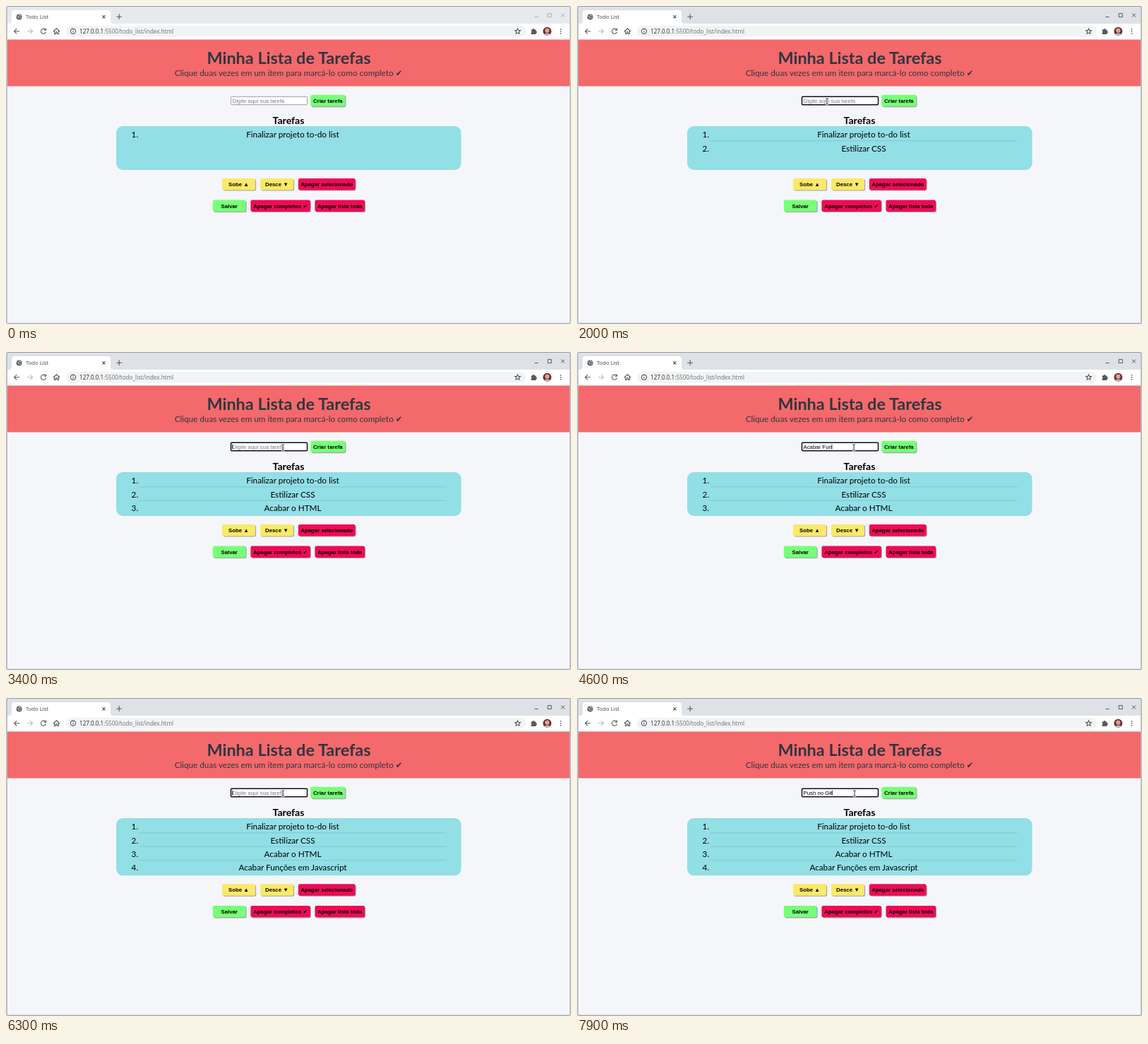
An HTML page for the animation above (8000 ms loop, 800x450 px).

```html
<!DOCTYPE html>
<html lang="pt">
<head>
<meta charset="utf-8">
<title>Todo List</title>
<style>
  html, body { margin: 0; width: 100%; height: 100%; overflow: hidden; }
  svg { display: block; width: 800px; height: 450px; }
  text { white-space: pre; }
  .ui { font: 8.1px "Open Sans", "Noto Sans", sans-serif; }
  .lato { font: 11.71px Lato, "DejaVu Sans", sans-serif; }
  .form { font: 7.81px "Liberation Sans", "DejaVu Sans", Arial, sans-serif; }
  .bold { font-weight: 700; }
  .mid { text-anchor: middle; }
  .icon { fill: none; stroke: #55595e; stroke-width: 1.1; }
</style>
</head>
<body>
<svg viewBox="0 0 800 450">
  <!-- browser window -->
  <rect id="strip" width="800" height="450"/>
  <path d="M4 25Q8 25 8 21V10Q8 6 12 6H144Q148 6 148 10V21Q148 25 152 25H798V48H2V25Z" fill="#fff"/>
  <circle cx="18.6" cy="15.4" r="4" fill="#55595e"/>
  <path d="M15.6 14l2.6 1.5-.4 2.3M18.5 12l.8 1.7 2.2.5M20 17.8l1-1.7" fill="none" stroke="#fff" stroke-width=".9"/>
  <text class="ui" x="28" y="18" style="font-size:7.7px" fill="#3c4043">Todo List</text>
  <g class="icon">
    <path d="M136.4 13.2l4.2 4.2m0-4.2l-4.2 4.2M156.3 15.2h7.8m-3.9-3.9v7.8"/>
    <path d="M19.2 35.7h-7.6m3.6-3.6l-3.6 3.6 3.6 3.6"/>
    <path d="M30 35.7h7.6m-3.6-3.6l3.6 3.6-3.6 3.6" stroke="#b9bbbe"/>
    <path d="M55.8 33.3a3.6 3.6 0 1 0 .8 3.3M56.6 31.6v2.7h-2.8"/>
    <path d="M67 36l4.5-4.2L76 36M68.5 35v4.5h2v-2.7h2v2.7h2V35"/>
  </g>
  <rect x="85" y="28" width="651" height="15.4" rx="7.7" fill="#f1f3f4"/>
  <g class="icon" stroke-width=".9">
    <circle cx="95" cy="35.7" r="3.6"/>
    <path d="M95 35.2v2.4M95 33.4v.9"/>
    <path d="M724.5 31.9l1.1 2.5 2.7.3-2 1.8.6 2.7-2.4-1.4-2.4 1.4.6-2.7-2-1.8 2.7-.3Z"/>
  </g>
  <text class="ui" x="104" y="38.6" fill="#6a6d71"><tspan fill="#26282b">127.0.0.1</tspan>:5500/todo_list/index.html</text>
  <path d="M743.5 33.5h2a1.4 1.4 0 0 1 2.8 0h2.1v2.1a1.4 1.4 0 0 1 0 2.8v1.5h-6.9v-2a1.4 1.4 0 0 0 0-2.6Z" fill="#55595e"/>
  <clipPath id="face"><circle cx="766.3" cy="35.7" r="6"/></clipPath>
  <g clip-path="url(#face)">
    <path d="M760 29h13v13h-13Z" fill="#6b3038"/>
    <circle cx="766.3" cy="34.7" r="3.1" fill="#d8a493"/>
    <ellipse cx="766.3" cy="42" rx="5" ry="3.5" fill="#c3b4b5"/>
  </g>
  <g fill="#55595e"><circle cx="785.5" cy="32.8" r=".9"/><circle cx="785.5" cy="35.8" r=".9"/><circle cx="785.5" cy="38.8" r=".9"/></g>
  <path id="controls" d="M748.5 15.5h5M767.2 10.6h5v5h-5ZM786 10.6l5 5m0-5l-5 5" fill="none"/>

  <!-- page -->
  <path d="M2 47.5H798V448H2Z" fill="#f5f6fa"/>
  <path d="M2 47.5H798V113.5H2Z" fill="#f4696b"/>
  <g class="lato mid">
    <text class="bold" x="400.5" y="81.8" style="font-size:23.43px" fill="#2f3640">Minha Lista de Tarefas</text>
    <text x="400" y="99" fill="#2f3640">Clique duas vezes em um item para marcá-lo como completo ✔</text>
    <text class="bold" x="400" y="167" style="font-size:14.06px">Tarefas</text>
  </g>
  <rect id="field" x="318.5" y="128.3" width="108" height="11.4" rx="1.2" fill="#fff"/>
  <text id="entry" class="form" x="320.5" y="136.7"></text>
  <path id="caret" d="M0 130.6v7" stroke="#000" stroke-width=".8"/>
  <rect id="box" x="156" y="170" width="488.5" rx="9.5" fill="#92dfe5"/>
  <g id="list" class="lato"></g>
  <g id="top" class="form bold mid"></g>
  <g id="actions" class="form bold mid"></g>
  <g id="mouse" fill="none">
    <path id="beam" d="M-2.2 -4.2q2.2 0 2.2 1.2q0 -1.2 2.2 -1.2M0 -3V3M-2.2 4.2q2.2 0 2.2 -1.2q0 1.2 2.2 1.2" stroke="#fff" stroke-width="2"/>
    <use href="#beam" style="stroke:#222;stroke-width:.9"/>
    <path d="M-2.2 -4.2q2.2 0 2.2 1.2q0 -1.2 2.2 -1.2M0 -3V3M-2.2 4.2q2.2 0 2.2 -1.2q0 1.2 2.2 1.2" stroke="#222" stroke-width=".9"/>
  </g>
  <rect x="1" y=".5" width="798" height="448.8" rx="2" fill="none" stroke="#96999f"/>
</svg>
<script>
const LOOP = 8000, STEP = 100, ROW = 19.35;
const GREEN = '#78ff78', YELLOW = '#fbe967', RED = '#ee0b55';

// key times in ms: first letter, time per letter, Enter
const tasks = [
  { text: 'Finalizar projeto to-do list', enter: -1 },
  { text: 'Estilizar CSS', start: 250, pace: 90, enter: 1450 },
  { text: 'Acabar o HTML', start: 2250, pace: 70, enter: 3200 },
  { text: 'Acabar Funções em Javascript', start: 3800, pace: 85, enter: 6150 },
  { text: 'Push no Git', start: 6850, pace: 100, enter: LOOP }
];

const el = id => document.getElementById(id);
const set = (id, attrs) => {
  for (const k in attrs) el(id).setAttribute(k, attrs[k]);
};
const show = (node, on) => { node.style.display = on ? '' : 'none'; };

function button(x, y, w, color, label) {
  const rect = (d, fill) =>
    `<rect x="${x + d}" y="${y + d}" width="${w}" height="16.4" rx="2.4" fill="${fill}"/>`;
  return rect(1.1, '#a3a4a8') + rect(0, color) +
    `<text x="${x + w / 2}" y="${y + 11}">${label}</text>`;
}

el('top').innerHTML = button(431.3, 125.7, 49, GREEN, 'Criar tarefa');
el('actions').innerHTML =
  button(306, 244, 47, YELLOW, 'Sobe ▲') +
  button(360, 244, 47, YELLOW, 'Desce ▼') +
  button(413.8, 244, 80.8, RED, 'Apagar selecionado') +
  button(292.8, 274.6, 46.8, GREEN, 'Salvar') +
  button(346.4, 274.6, 84.4, RED, 'Apagar completos ✔') +
  button(437.4, 274.6, 70.6, RED, 'Apagar lista toda');

el('list').innerHTML = tasks.slice(0, 4).map((task, i) => {
  const y = 186.3 + i * ROW;
  const rule = i ? `<path d="M188.5 ${y - 14.8}H623.5" stroke="#7fc9d1" stroke-width=".9"/>` : '';
  return `<g>${rule}<text x="177.6" y="${y}">${i + 1}.</text>
    <text class="mid" x="406" y="${y}">${task.text}</text></g>`;
}).join('');

function draw(t) {
  const active = t >= 100, focused = t >= 200;
  const count = tasks.filter(task => t >= task.enter).length;
  const { text, start, pace } = tasks[count];
  const typed = Math.max(0, Math.min(text.length, Math.floor((t - start) / pace) + 1));
  const lastKey = typed ? start + (typed - 1) * pace : Math.max(200, tasks[count - 1].enter);

  set('strip', { fill: active ? '#dee1e6' : '#e7eaed' });
  set('controls', { stroke: active ? '#55595e' : '#a9acb0' });
  set('field', {
    stroke: focused ? '#101018' : '#85858a',
    'stroke-width': focused ? 1.5 : 0.8
  });

  const entry = el('entry');
  entry.textContent = typed ? text.slice(0, typed) : 'Digite aqui sua tarefa';
  set('entry', { fill: typed ? '#000' : '#7c7c80' });
  const caretX = 320.6 + (typed ? entry.getComputedTextLength() : 0);
  set('caret', { transform: `translate(${caretX} 0)` });
  show(el('caret'), focused && (t - lastKey) % 1000 < 500);

  [...el('list').children].forEach((row, i) => show(row, i < count));
  const grow = count > 3 ? ROW : 0;
  set('box', { height: 62 + grow });
  set('actions', { transform: `translate(0 ${grow})` });

  const move = Math.max(0, Math.min(1, (t - 2050) / 250));
  const mouseX = 354 + 38 * move * move * (3 - 2 * move) + (t >= 6600 ? 1 : 0);
  set('mouse', { transform: `translate(${mouseX} 135)` });
  show(el('mouse'), active);
}

function tick() {
  draw(Math.floor(performance.now() % LOOP / STEP) * STEP);
  requestAnimationFrame(tick);
}
tick();
</script>
</body>
</html>
```
